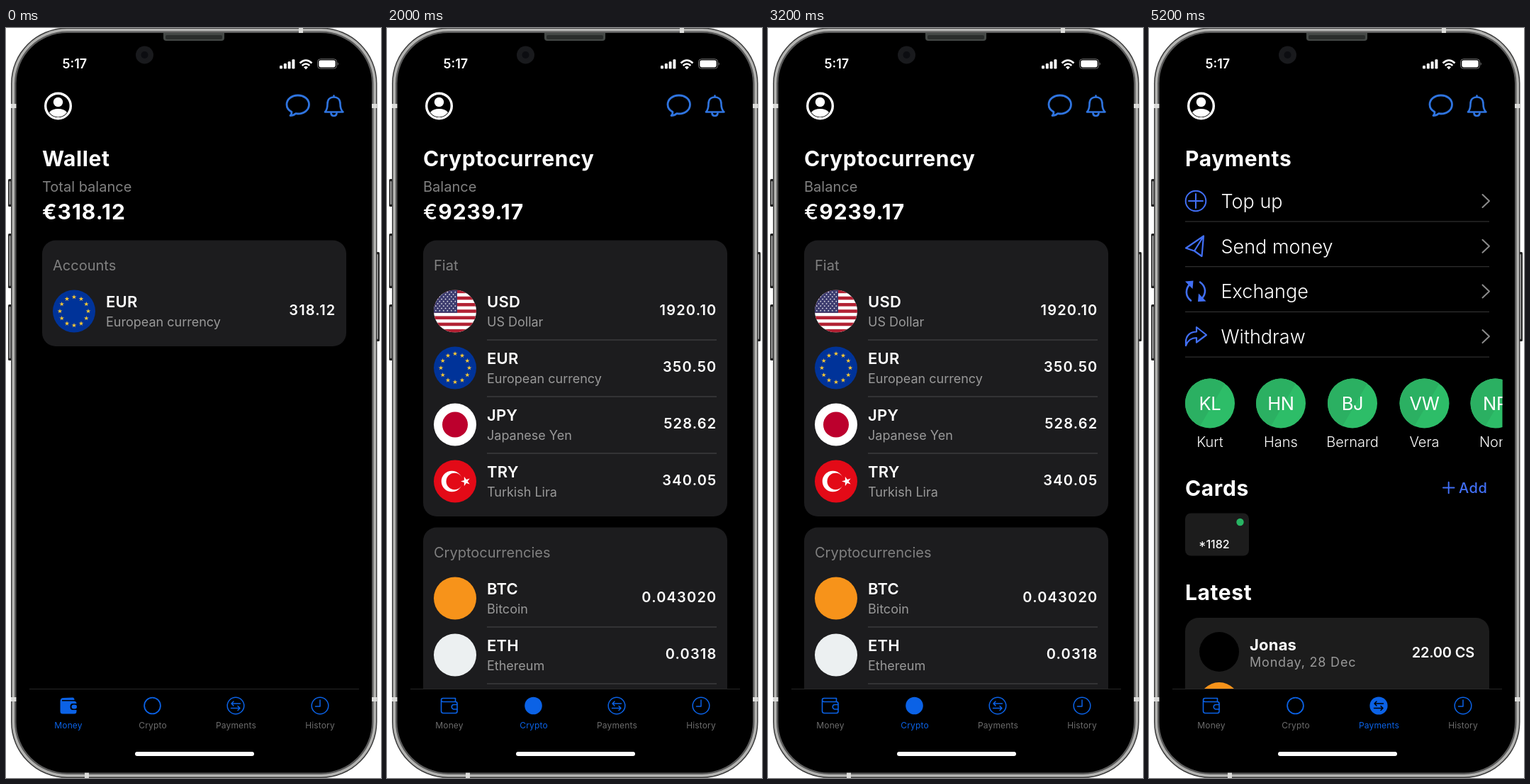
An HTML page that plays this animation: 529 by 1058 pixels, repeating every 6000 ms.

```html
<!DOCTYPE html>
<html lang="en">
<head>
<meta charset="utf-8">
<title>Wallet</title>
<style>
  html, body { margin: 0; width: 100%; height: 100%; overflow: hidden; background: #fff; }
  svg { display: block; width: 100%; height: 100%; font-family: Inter, Roboto, sans-serif; font-optical-sizing: none; }
</style>
</head>
<body>
<svg id="stage" viewBox="0 0 529 1058"></svg>
<script>
const BLUE = '#0b62e6', ICON = '#2f74df', LIST = '#416ff5', GREY = '#808080', PANEL = '#1c1c1e';

// Drawing helpers
const text = (x, y, s, size, weight = 400, fill = '#fff', gap = 0, anchor = 'start') =>
  `<text x="${x}" y="${y}" font-size="${size}" font-weight="${weight}" fill="${fill}" letter-spacing="${gap}" text-anchor="${anchor}">${s}</text>`;
const rect = (x, y, w, h, r, fill, extra = '') =>
  `<rect x="${x}" y="${y}" width="${w}" height="${h}" rx="${r}" fill="${fill}" ${extra}/>`;
const disc = (x, y, r, fill, extra = '') => `<circle cx="${x}" cy="${y}" r="${r}" fill="${fill}" ${extra}/>`;
const ring = (x, y, r, color, w) => disc(x, y, r, 'none', `stroke="${color}" stroke-width="${w}"`);
const line = (d, color, w) =>
  `<path d="${d}" fill="none" stroke="${color}" stroke-width="${w}" stroke-linecap="round" stroke-linejoin="round"/>`;
const shape = (d, fill) => `<path d="${d}" fill="${fill}"/>`;
const rule = (x1, x2, y, color) => `<path d="M${x1} ${y}H${x2}" stroke="${color}"/>`;
const list = (n, f) => Array.from({ length: n }, (_, i) => f(i)).join('');
const star = (x, y, r, fill, turn = -90) => shape('M' + list(10, i => {
  const a = (turn + i * 36) * Math.PI / 180, q = i % 2 ? r * 0.382 : r;
  return `${i ? 'L' : ''}${(x + q * Math.cos(a)).toFixed(2)} ${(y + q * Math.sin(a)).toFixed(2)}`;
}) + 'Z', fill);
const title = (y, s) => text(51, y, s, 30, 700, '#fff', 0.6);
const balance = (label, value) =>
  text(51, 231, label, 20, 400, GREY) + text(51, 270, value, 30, 700, '#fff', 1);

// Round badges, centred on 0,0
const badges = {
  EUR: disc(0, 0, 30, '#003399') + list(12, i => {
    const a = i * Math.PI / 6;
    return star(20 * Math.sin(a), -20 * Math.cos(a), 3.5, '#fc3');
  }),
  USD: '<g clip-path="url(#round)">' + rect(-30, -30, 60, 60, 0, '#fff') +
    list(7, i => rect(-30, -30 + i * 9.23, 60, 4.62, 0, '#b22234')) +
    rect(-30, -30, 33, 32.3, 0, '#3c3b6e') +
    list(9, r => list(r % 2 ? 5 : 6, c =>
      star(-27.2 + c * 5.5 + (r % 2) * 2.75, -26.8 + r * 3.25, 1.4, '#fff'))) + '</g>',
  JPY: disc(0, 0, 30, '#fff') + disc(0, 0, 18, '#bc002d'),
  TRY: disc(0, 0, 30, '#e30a17') + disc(-4.5, 0, 14.8, '#fff') + disc(-0.7, 0, 11.8, '#e30a17') +
    star(15, 0, 7, '#fff', 180),
  BTC: disc(0, 0, 30, '#f7931a'),
  ETH: disc(0, 0, 30, '#ecf0f1')
};

const account = (y, code, name, value) =>
  `<g transform="translate(96 ${y})">${badges[code]}</g>` +
  text(141, y - 5.5, code, 22, 600, '#fff', 0.2) +
  text(141, y + 21, name, 18, 400, '#999') +
  text(465.5, y + 5.5, value, 20, 600, '#fff', 1.2, 'end');

const panel = (y, h, label, rows) => rect(51, y, 429, h, 19, PANEL) +
  text(66, y + 42.5, label, 20, 400, GREY) +
  rows.map((row, i) => account(y + 100 + i * 80, ...row) +
    (i ? rule(141, 465, y + 60.5 + i * 80, '#4b4b4d') : '')).join('');

const wallet = () => title(195, 'Wallet') + balance('Total balance', '€318.12') +
  panel(299.5, 149.5, 'Accounts', [['EUR', 'European currency', '318.12']]);

const crypto = () => title(195, 'Cryptocurrency') +
  balance('Balance', '<tspan font-weight="500">€</tspan>9239.17') +
  panel(299.5, 389.5, 'Fiat', [
    ['USD', 'US Dollar', '1920.10'],
    ['EUR', 'European currency', '350.50'],
    ['JPY', 'Japanese Yen', '528.62'],
    ['TRY', 'Turkish Lira', '340.05']
  ]) +
  panel(704.5, 300, 'Cryptocurrencies', [
    ['BTC', 'Bitcoin', '0.043020'],
    ['ETH', 'Ethereum', '0.0318']
  ]) + rule(141, 465, 925, '#4b4b4d');

const actions = [
  ['Top up', ring(66, 244, 14.3, LIST, 2) + line('M66 234V254M56 244H76', LIST, 2)],
  ['Send money', line('M52 310.5L77 293.5L74.5 322L64 314.5ZM64 314.5L77 293.5', LIST, 2.2)],
  ['Exchange', line('M59 384.5C51 378 51 368 58 361M72 358.5C81 365 81 375 74 382', LIST, 2.6) +
    shape('M51 357.5L62.5 356.5L61.5 368ZM80.5 385.5L69 386L70 374.5Z', LIST)],
  ['Withdraw', line('M52 448V443C52 434 58 428.5 67 428.5V422L81 433L67 443.5V437C60 437 55 440 52 448Z', LIST, 2.2)]
];
const friends = [['KL', 'Kurt', 86], ['HN', 'Hans', 186], ['BJ', 'Bernard', 287], ['VW', 'Vera', 388.5], ['NR', 'Nora', 488.5]];

const payments = () => title(195, 'Payments') +
  actions.map(([name, icon], i) => {
    const y = 244 + i * 63.7;
    return icon + text(101.5, y + 10, name, 27, 300) +
      line(`M470.5 ${y - 9}L480 ${y}L470.5 ${y + 9}`, '#8a8a8a', 2) + rule(51, 480, y + 29, '#3a3a3a');
  }).join('') +
  friends.map(([initials, name, x]) =>
    disc(x, 529.5, 35, '#2dbd68') +
    shape(`M${x + 21} 501.5A35 35 0 1 0 ${x - 14} 561.6Z`, '#2bb062') +
    text(x, 538.5, initials, 25.5, 400, '#fff', -0.3, 'middle') +
    text(x, 591, name, 20, 300, '#fff', 0, 'middle')).join('') +
  title(660, 'Cards') +
  line('M415 648.5H430.5M422.7 640.7V656.3', LIST, 2) + text(437, 656, 'Add', 20, 500, LIST, 0.5) +
  rect(51, 684.5, 90, 60, 8, '#1c1c1c') + disc(128.5, 697, 5.2, '#28b463') +
  text(70, 734, '*1182', 16, 500) +
  title(807, 'Latest') +
  rect(51, 832, 429, 160, 19, '#1c1c1c') + disc(99, 880, 28, '#000') + disc(99, 951.5, 28.5, '#f7931a') +
  text(142, 878, 'Jonas', 22, 700, '#fff', 0.2) +
  text(142, 901, 'Monday, 28 Dec', 18, 400, '#999', 0.8) +
  text(459, 888, '22.00 CS', 20, 600, '#fff', -0.2, 'end');

// Bottom bar icons, plain and selected
const tabs = [
  ['Money', 88, on => on
    ? shape('M76.5 950Q76.5 945 81 945L94 944.5Q96.5 944.5 96.5 948H79V949.5H96Q99.5 949.5 99.5 953H94Q90.5 953 90.5 957.5T94 962H99.5V964Q99.5 967.5 96 967.5H80Q76.5 967.5 76.5 964Z', BLUE) +
      rect(92.5, 954.5, 7.5, 6, 3, BLUE)
    : line('M76.5 948.5V963.5Q76.5 966.5 79.5 966.5H96.5Q99 966.5 99 964V953Q99 950.5 96.5 950.5H79Q76.5 950.5 76.5 948T79 945.5H96.5V950', BLUE, 1.6) +
      line('M99 954.5H94.5A3.2 3.2 0 0 0 94.5 961H99', BLUE, 1.6)],
  ['Crypto', 207, on => on ? disc(206.5, 956, 12.3, BLUE) : ring(206.5, 956, 11.4, BLUE, 1.8)],
  ['Payments', 324.5, on => (on ? disc(324, 956, 12.6, BLUE) : ring(324, 956, 11.8, BLUE, 1.5)) +
    line('M330.5 953H318M321 950L318 953L321 956M317.5 959.5H330M327 956.5L330 959.5L327 962.5', on ? '#000' : BLUE, 1.5)],
  ['History', 443, () => ring(443, 956, 11.8, BLUE, 1.5) + line('M443 948V957H436.5', BLUE, 1.5)]
];
const bar = active => tabs.map(([name, x, icon], i) => icon(i === active) +
  text(x, 988, name, 12, 400, i === active ? BLUE : '#6c6c6c', 0.15, 'middle')).join('');

const buttons = [[3, 213, 39], [3, 290, 77], [3, 390, 79], [521.5, 316, 126]];
const phone = buttons.map(([x, y, h]) =>
    rect(x, y, 5.5, h, 1.5, '#222') + rect(x + 1.5, y + 3, 2, h - 6, 1, '#aaa')).join('') +
  rect(7, -0.5, 516.5, 1058.5, 79, '#3c3c3c') +
  rect(8.5, 1, 513.5, 1055.5, 77.5, '#b4b4b2') +
  rect(12, 4.5, 506.5, 1048.5, 74, '#5b5b5b') +
  [110, 947].map(y => rect(7, y - 3, 9, 6, 0, '#dcdcda') + rect(514.5, y - 3, 9, 6, 0, '#dcdcda')).join('') +
  rect(413, 0, 6, 8, 0, '#dcdcda') + rect(111, 1050, 6, 8, 0, '#dcdcda') +
  rect(14.5, 7, 501.5, 1043.5, 71.5, '#000') +
  shape('M222 7H308V14Q308 18 304 18H226Q222 18 222 14Z', '#454947') +
  rect(225, 10, 80, 6, 2, '#2a2d2c') +
  disc(195.5, 38, 12.5, '#191a1d') + disc(195.5, 38, 5, '#0c0d11');

const status = text(79.5, 57, '5:17', 18, 600) +
  list(4, i => rect(386 + i * 5.8, 53 - i * 2.9, 4, 4.5 + i * 2.9, 1.2, '#fff')) +
  '<path d="M414.5 49.5Q423 41.5 431.5 49.5M417.7 53Q423 48 428.3 53" fill="none" stroke="#fff" stroke-width="2.6"/>' +
  shape('M420 55.3Q423 52.8 426 55.3L423 58.4Z', '#fff') +
  rect(439.5, 43.8, 27, 13.4, 4, 'none', 'stroke="#777"') + rect(441.3, 45.6, 23.4, 9.8, 2.4, '#fff') +
  shape('M467.8 48.2Q470 50.5 467.8 52.8Z', '#777');

const header = ring(73.5, 110, 17.8, '#fff', 3.4) + disc(73.5, 104.5, 6.7, '#fff') +
  shape('M61 119Q65 114 73.5 114T86 119Q81 125.5 73.5 125.5T61 119Z', '#fff') +
  line('M403 118.5C398.5 116 396 112.5 396 108C396 100.5 403 95 411.8 95C420.5 95 427.5 100.5 427.5 108C427.5 115.5 420.5 121 411.8 121L408.5 120.7Q405.5 123.5 401 123.5Q403.2 121.5 403 118.5Z', ICON, 2.8) +
  line('M450 118.5C453 115.5 453.5 112 453.5 107C453.5 101 457 97.5 462.5 97.5S471.5 101 471.5 107C471.5 112 472 115.5 475.5 118.5ZM462.5 97V95.5M458.5 120.5Q459 124 462.5 124T466.5 120.5', ICON, 2.6);

const screens = [wallet, crypto, payments].map((draw, i) =>
  `<g class="screen"><g clip-path="url(#view)">${draw()}</g>${bar(i)}</g>`).join('');

document.getElementById('stage').innerHTML =
  '<defs><clipPath id="round"><circle r="30"/></clipPath>' +
  '<clipPath id="view"><rect x="33" y="130" width="465.5" height="802"/></clipPath></defs>' +
  phone + status + header + screens + rule(33, 498, 932.5, '#262626') + rect(182, 1021, 168, 6, 3, '#fff');

const groups = document.querySelectorAll('.screen');
function frame(now) {
  const active = Math.floor(now / 2000) % 3;
  groups.forEach((g, i) => g.style.display = i === active ? '' : 'none');
  requestAnimationFrame(frame);
}
frame(0);
</script>
</body>
</html>
```
